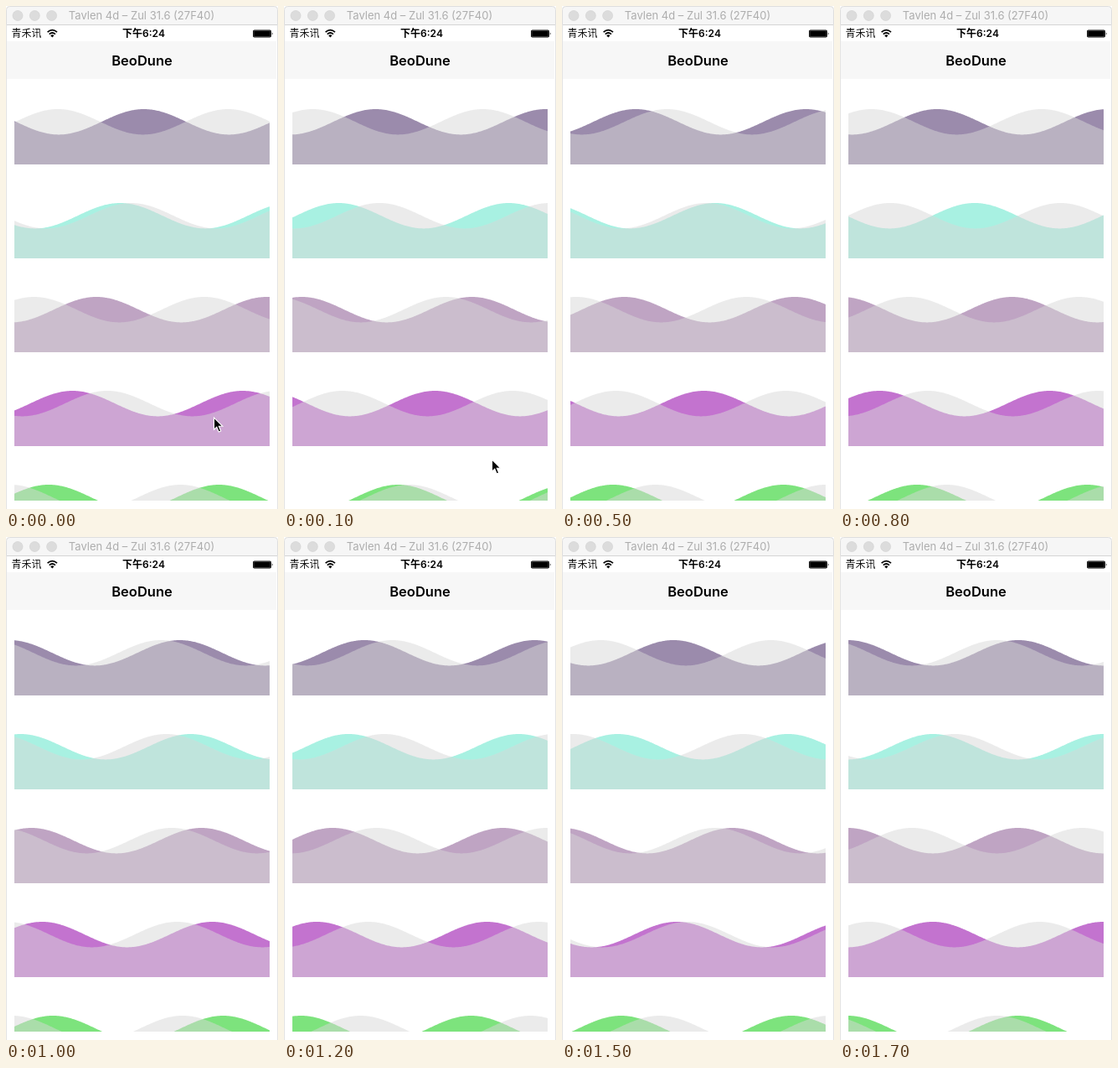
An HTML page for the animation above (1800 ms loop, 325 px wide and 600 px high).

```html
<!DOCTYPE html>
<html lang="zh">
<head>
<meta charset="utf-8">
<title>Waves</title>
<style>
html, body { margin: 0; width: 100%; height: 100%; overflow: hidden; background: #fff; }
svg { display: block; width: 325px; height: 600px; }
text { text-anchor: middle; font-family: Inter, "Noto Sans CJK SC", "Noto Sans CJK", sans-serif; }
</style>
</head>
<body>
<svg viewBox="0 0 325 600">
  <defs>
    <clipPath id="screen"><rect width="325" height="590"/></clipPath>
  </defs>
  <rect width="325" height="600" fill="#fff"/>
  <rect x="1" y="42" width="322" height="45" fill="#f7f7f7"/>
  <g id="waves" clip-path="url(#screen)"></g>

  <!-- window bar -->
  <path d="M0 22V4Q0 0 4 0H321Q325 0 325 4V22Z" fill="#f6f6f6"/>
  <path d="M0 22.5H325" stroke="#d4d4d4"/>
  <path d="M.5 22V600M324.5 22V600" stroke="#e4e4e4"/>
  <path d="M.5 22V4.5Q.5 .5 4.5 .5H320.5Q324.5 .5 324.5 4.5V22" fill="none" stroke="#dedede"/>
  <g fill="#dcdcdc" stroke="#d0d0d0" stroke-width=".6">
    <circle cx="14" cy="11.5" r="6"/>
    <circle cx="34.3" cy="11.5" r="6"/>
    <circle cx="54.6" cy="11.5" r="6"/>
  </g>
  <text x="162" y="16.2" font-size="13" fill="#adadad">Tavlen 4d – Zul 31.6 (27F40)</text>

  <!-- status bar -->
  <text x="24.5" y="37.3" font-size="12" fill="#111">青禾讯</text>
  <g fill="none" stroke="#000" stroke-width="1.7">
    <path d="M49.6 31.2Q55.3 26 61 31.2"/>
    <path d="M51.7 33.6Q55.3 30.4 58.9 33.6"/>
  </g>
  <path d="M53.2 35.2Q55.3 33.4 57.4 35.2L55.3 37.5Z"/>
  <text x="164.5" y="37.2" font-size="12" font-weight="600">下午6:24</text>
  <rect x="295" y="28.5" width="22" height="9" rx="1.8" fill="#000"/>
  <rect x="296" y="29.5" width="20" height="7" rx="1" fill="none" stroke="#fff" stroke-width=".4" opacity=".6"/>
  <path d="M317.8 31.3Q319.6 33 317.8 34.8Z"/>

  <text x="162.5" y="71" font-size="16.5" font-weight="600">BeoDune</text>
  <path id="cursor" d="M0 0V14.2L3.3 11.2L5.7 17L8.2 16L5.8 10.3H10.3Z" stroke="#fff" stroke-width="1.1"/>
</svg>
<script>
const LOOP = 1800, STEP = 100;
const LEFT = 10, RIGHT = 315, PERIOD = 610 / 3;
const AMP = 15.2, PITCH = 112;
const COLORS = ["#9b8bac", "#a8f1e2", "#bfa4c3", "#c373cf", "#7de37d"];
// travel at [step, distance]; the pace is slightly uneven
const TRAVEL = [[0, 0], [3, 23.65], [5, 40], [8, 65.05], [12, 96.95], [15, 120.7], [17, 138.35]];

const layer = document.getElementById("waves");
const cursor = document.getElementById("cursor");

function addPath(fill, opacity) {
  const p = document.createElementNS("http://www.w3.org/2000/svg", "path");
  p.setAttribute("fill", fill);
  p.setAttribute("fill-opacity", opacity);
  layer.appendChild(p);
  return p;
}

const rows = COLORS.map((color, i) => ({
  top: 123 + i * PITCH,
  speed: 7 + 2 * i,
  front: 164.7 - 28.4 * i,
  back: 62 + 87.45 * i,
  tint: addPath(color, 1),
  veil: addPath("#d7d7d7", 0.5)
}));

function travel(step) {
  const i = Math.max(1, TRAVEL.findIndex(k => k[0] >= step));
  const [s0, d0] = TRAVEL[i - 1], [s1, d1] = TRAVEL[i];
  return d0 + (d1 - d0) * (step - s0) / (s1 - s0);
}

function wave(top, crest) {
  const bottom = top + 66;
  let d = `M${LEFT} ${bottom}`;
  for (let x = LEFT; x <= RIGHT; x++) {
    const y = top + AMP * (1 - Math.cos((x - crest) * 2 * Math.PI / PERIOD));
    d += `L${x} ${y.toFixed(2)}`;
  }
  return d + `V${bottom}Z`;
}

function draw(ms) {
  const step = Math.floor((ms % LOOP) / STEP);
  const u = travel(step);
  for (const r of rows) {
    r.tint.setAttribute("d", wave(r.top, r.front - r.speed * u));
    r.veil.setAttribute("d", wave(r.top, r.back - r.speed * u / 2));
  }
  cursor.setAttribute("transform", `translate(248.5 ${491 + 50 * step})`);
  cursor.setAttribute("visibility", step < 3 ? "visible" : "hidden");
}

const start = performance.now();
function tick() {
  draw(performance.now() - start);
  requestAnimationFrame(tick);
}
draw(0);
requestAnimationFrame(tick);
</script>
</body>
</html>
```
